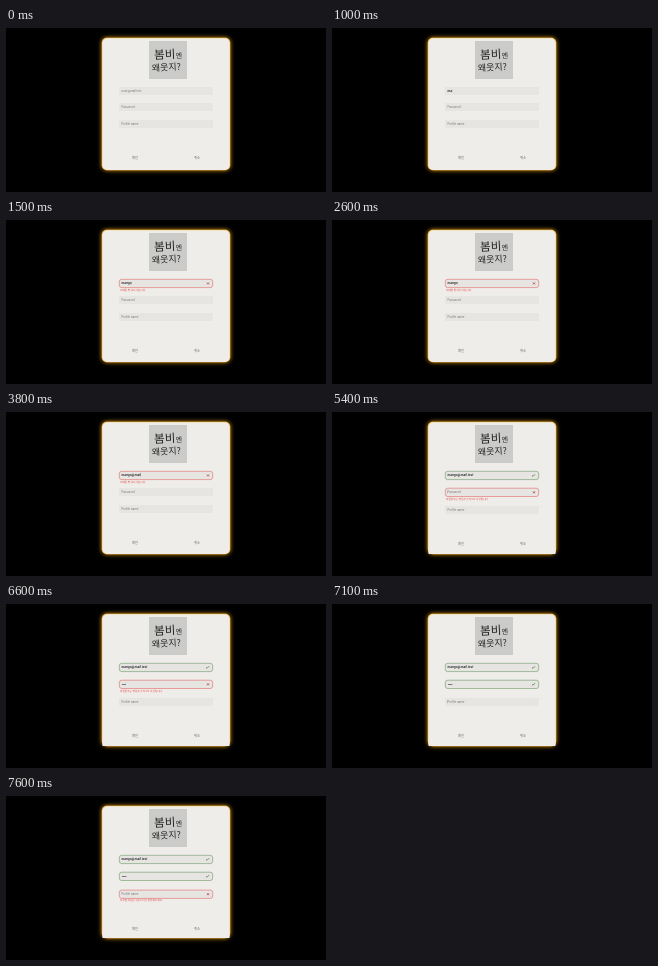
An HTML page with a canvas that plays this animation: 320 by 164 pixels, repeating every 8 s.

```html
<!DOCTYPE html>
<html lang="ko">
<head>
<meta charset="utf-8">
<title>Sign-up form</title>
<style>
  html, body { margin: 0; width: 100%; height: 100%; overflow: hidden; background: #000; }
  canvas { display: block; width: 320px; height: 164px; }
</style>
</head>
<body>
<canvas></canvas>
<script>
const LOOP = 8000;
const FADE = 100;
const LATIN = 'Inter, "Noto Sans CJK KR", sans-serif';
const HANGUL = '"Noto Sans CJK KR", "Noto Sans CJK", sans-serif';
const RED = '#e46a6a', GREEN = '#6f9a69', CARD = '#eeedea', FIELD = '#e6e5e2';

// Times in ms: focus, first error, accepted, and one per key press.
const fields = [
  { hint: 'user@mail.test', value: 'mango@mail.test', top: 59,
    error: '이메일 형식이 아닙니다.', focus: 500, bad: 1200, good: 4350,
    keys: [900, 1000, 1200, 1300, 1400, 2700, 3100, 3200, 3300, 3800, 3900, 4000, 4200, 4400, 5100] },
  { hint: 'Password', value: '••••••', top: 75, spacing: '-0.8px',
    error: '비밀번호는 영문과 숫자 6자 이상입니다.', focus: 5300, bad: 5250, good: 6620,
    keys: [6100, 6200, 6300, 6400, 6600, 6700] },
  { hint: 'Profile name', value: '', top: 92,
    error: '프로필 이름은 2글자 이상 입력해주세요.', focus: 7100, bad: 7100, good: Infinity,
    keys: [] }
];

const canvas = document.querySelector('canvas');
const ctx = canvas.getContext('2d');
const ratio = window.devicePixelRatio || 1;
canvas.width = 320 * ratio;
canvas.height = 164 * ratio;

const ramp = (t, start) => Math.min(1, Math.max(0, (t - start) / FADE));

function text(str, x, y, size, color, { font = LATIN, weight = 400, align = 'left', spacing = '0px' } = {}) {
  ctx.font = `${weight} ${size}px ${font}`;
  ctx.letterSpacing = spacing;
  ctx.textAlign = align;
  ctx.textBaseline = 'middle';
  ctx.fillStyle = color;
  ctx.fillText(str, x, y);
}

function box(x, y, w, h, r) {
  ctx.beginPath();
  ctx.roundRect(x, y, w, h, r);
}

function polyline(points, color, width) {
  ctx.beginPath();
  points.forEach(([x, y]) => ctx.lineTo(x, y));
  ctx.strokeStyle = color;
  ctx.lineWidth = width;
  ctx.stroke();
}

function drawCard(squareFoot) {
  ctx.save();
  ctx.shadowColor = '#f0a010';
  ctx.shadowBlur = 4.5 * ratio;
  ctx.fillStyle = '#f7c050';
  box(95.8, 9.8, 128.4, 132.4, 5);
  ctx.fill();
  ctx.restore();
  ctx.fillStyle = CARD;
  box(96.3, 10.3, 127.4, 131.6, squareFoot ? [5, 5, 1, 1] : 5);
  ctx.fill();
}

function drawHeading() {
  ctx.fillStyle = '#cbcbc9';
  ctx.fillRect(143, 13, 38, 38);
  ctx.save();
  ctx.translate(161, 32);
  ctx.rotate(-0.05);
  const style = { font: HANGUL, weight: 500, align: 'center' };
  text('봄비', -2, -6, 11.5, '#222', style);
  text('엔', 12, -4, 7, '#222', style);
  text('왜웃지?', -1, 7, 9, '#222', style);
  ctx.restore();
}

function drawField(field, t, shift) {
  const { bad, good, keys, focus } = field;
  const shown = ramp(t, bad), accepted = ramp(t, good);
  const y = field.top + shift, h = 8 + 0.9 * shown, mid = y + h / 2;

  ctx.fillStyle = FIELD;
  box(113, y, 94, h, 1 + 1.6 * shown);
  ctx.fill();

  for (const [color, alpha] of [[RED, shown * (1 - accepted)], [GREEN, accepted]]) {
    ctx.globalAlpha = alpha;
    box(113.3, y + 0.3, 93.4, h - 0.6, 2.4);
    ctx.strokeStyle = color;
    ctx.lineWidth = 0.6;
    ctx.stroke();
    if (color === RED) {
      polyline([[201.1, mid - 0.9], [202.9, mid + 0.9]], '#b52f31', 0.8);
      polyline([[201.1, mid + 0.9], [202.9, mid - 0.9]], '#b52f31', 0.8);
      text(field.error, 114, y + h + 1.8, 2.6, '#e94b4b', { font: HANGUL });
    } else {
      polyline([[200, mid], [201, mid + 0.9], [203, mid - 1.2]], '#386a33', 0.7);
    }
  }
  ctx.globalAlpha = 1;

  const typed = field.value.slice(0, keys.filter(k => k <= t).length);
  if (typed) text(typed, 115.5, mid, 3.05, '#202020', { weight: 600, spacing: field.spacing });
  else text(field.hint, 115.5, mid, 2.85, '#777');

  const next = fields[fields.indexOf(field) + 1];
  if (t >= focus && (!next || t < next.focus)) {
    const lastKey = Math.max(focus, ...keys.filter(k => k <= t));
    if ((t - lastKey) % 1000 < 500) {
      const x = 115.5 + (typed ? ctx.measureText(typed).width : 0);
      ctx.fillStyle = '#777';
      ctx.fillRect(x, mid - 1.5, 0.2, 3);
    }
  }
  return shift + h - 8;
}

function draw(t) {
  ctx.setTransform(ratio, 0, 0, ratio, 0, 0);
  ctx.fillStyle = '#000';
  ctx.fillRect(0, 0, 320, 164);
  drawCard(t >= 5300);
  drawHeading();
  const shift = fields.reduce((sum, field) => drawField(field, t, sum), 0);
  const button = { font: HANGUL, align: 'center' };
  text('확인', 129, 130 + shift, 3.3, '#666', button);
  text('취소', 191, 130 + shift, 3.3, '#666', button);
}

const start = performance.now();
function tick() {
  draw((performance.now() - start) % LOOP);
  requestAnimationFrame(tick);
}
tick();
</script>
</body>
</html>
```
